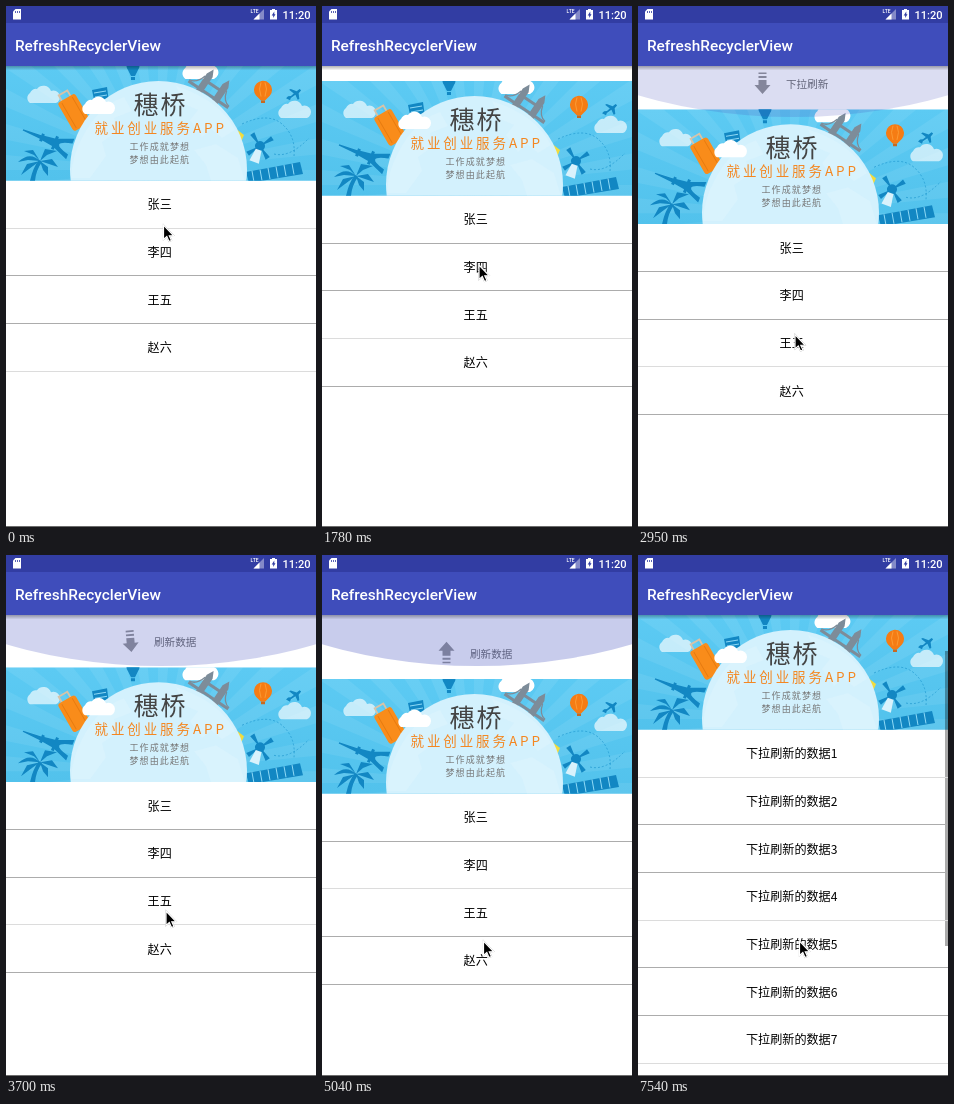
An HTML page that plays this animation: 310x521 px, repeating every 8000 ms.

```html
<!DOCTYPE html>
<html lang="zh-CN">
<head>
<meta charset="utf-8">
<title>RefreshRecyclerView</title>
<style>
html, body { margin: 0; width: 100%; height: 100%; overflow: hidden; background: #fff; }
svg { display: block; }
text { font-family: "Noto Sans CJK SC", "Noto Sans CJK", "Noto Sans", sans-serif; }
.ui { font-family: Roboto, sans-serif; font-weight: 500; fill: #fff; }
.mid { text-anchor: middle; }
#mouse { filter: drop-shadow(.6px .8px .5px rgba(0, 0, 0, .45)); }
</style>
</head>
<body>
<svg width="310" height="521" viewBox="0 0 310 521">
  <defs>
    <linearGradient id="sky" x2="0" y2="1">
      <stop stop-color="#5ccaf3"/><stop offset="1" stop-color="#52c2ec"/>
    </linearGradient>
    <linearGradient id="shade" x2="0" y2="1">
      <stop stop-opacity=".3"/><stop offset="1" stop-opacity="0"/>
    </linearGradient>
    <path id="cloud" d="M4 20a6 6 0 0 1 0-10 6 6 0 0 1 7-4 8 8 0 0 1 14 2 6 6 0 0 1 5 12Z"/>
    <path id="plane" d="M-9 1-6 0-3 1 1 0-2-6 0-6 5-1 9-2 10 0 6 2 4 8 2 8 2 2-4 3-6 5Z"/>
  </defs>
  <rect width="310" height="521" fill="#fff"/>

  <svg y="60" width="310" height="461">
    <g id="list">
      <g id="head">
        <text id="state" x="148" y="-21.500" font-size="10.600" fill="#6a6a6a"></text>
        <path id="arrow" fill="#949494" d="M0-11 8-2H4V3H-4V-2H-8ZM-4 5H4V7H-4ZM-4 9H4V10.6H-4Z"/>
        <path id="spin" fill="none" stroke="#e0303c" stroke-width="1.6"/>
      </g>
      <svg width="310" height="114.67">
        <rect width="310" height="115" fill="url(#sky)"/>
        <path id="rays" fill="#fff" opacity=".07"/>
        <g fill="#fff">
          <use href="#cloud" x="20" y="17" opacity=".65"/>
          <use href="#cloud" x="271" y="32" opacity=".65"/>
          <use href="#cloud" transform="translate(175 -9) scale(1.1)"/>
        </g>
        <g fill="#1287c3">
          <path transform="translate(42 74) rotate(22)"
            d="M-27-.6-8-2V-4H-5V-2.500L6-4V-7H9V-5L24-11V-6Q12-3 12 0T24 6V11L9 5V7H6V4L-5 2.500V4H-8V2L-27 .6Z"/>
          <path d="M24 115Q27 101 33 94L36 96Q30 104 29 115Z"/>
          <path d="M34 95Q24 85 12 96L22 94 34 95 21 98 15 109 27 100 34 95 27 84 18 85 28 89 34 95 39 83 51 85 41 89 34 95 46 93 52 101 43 98 34 95 42 101 42 110 37 104Z"/>
          <path d="M86 24 101 21 103 36 89 39Z"/>
          <path d="M122 4a6.500 6.500 0 1 1 10 0L129 10H125ZM125 11H129V14H125Z"/>
          <use href="#plane" transform="translate(287 28) rotate(-25) scale(.9)"/>
          <g transform="translate(254 80) rotate(20)">
            <path d="M0 0-13-7-10-11ZM0 0 7-13 11-10ZM0 0 13 7 10 11ZM0 0-7 13-11 10Z"/>
            <circle r="5"/>
            <path d="M-3 4 3 4 5 17H-5Z" fill="#d9f2fc"/>
          </g>
          <path id="tower" d="M240 106 294 96 297 108 243 117Z"/>
        </g>
        <path d="M88 27 100 25M89 31 101 29M90 35 101 33M246 105 248 116M254 103.500 256 114.500M262 102 264 113M270 100.500 272 111.500M278 99 280 110M286 97.500 288 108.500"
          stroke="#8fdaf6"/>
        <path d="M236 58Q262 46 276 58T288 90M268 88Q284 92 303 72" fill="none" stroke="#1f97cf"
          stroke-dasharray="2 2" opacity=".7"/>
        <g transform="translate(68 46) rotate(-30)">
          <path d="M-5-14V-22H5V-14" fill="none" stroke="#d8c3a8" stroke-width="1.8"/>
          <rect x="-10" y="-16" width="20" height="33" rx="3" fill="#f98c1a"/>
          <path d="M-6-14V15M6-14V15" stroke="#e87c10"/>
        </g>
        <g transform="translate(206 23) rotate(34)" fill="#7d8c99">
          <path d="M-24 5H24V8H-24ZM-13-10-9.500-17-6-10V11H-13ZM6-10 9.500-17 13-10V11H6ZM-7-5H7V-2H-7Z"/>
          <path d="M-24 5Q-16 4-13-7M24 5Q16 4 13-7" fill="none" stroke="#7d8c99" stroke-width="1.300"/>
        </g>
        <path d="M229 62 238 69 235 76Z" fill="#f2dc3c"/>
        <circle cx="152.500" cy="103.500" r="88.500" fill="#d3f1fd"/>
        <g fill="#eaf9ff" opacity=".25">
          <path d="M76 72Q92 40 118 31L126 45 108 52 112 65 96 76 100 90 84 112H65Q66 90 76 72Z"/>
          <path d="M170 20Q214 34 229 64L216 72 205 63 196 71 184 54 192 44 178 38Z"/>
          <path d="M188 84 210 78 232 92 239 115H205L200 99Z"/>
        </g>
        <use href="#cloud" x="75" y="28" fill="#fff"/>
        <g transform="translate(257 24.500)">
          <path d="M-7 5a9 9 0 1 1 14 0L2 10H-2Z" fill="#f57c14"/>
          <path d="M-2 6Q-5-2-2-8M2 6Q5-2 2-8" fill="none" stroke="#fb9a34"/>
          <path d="M-2 10H2V12.500H-2Z" fill="#c8691f"/>
        </g>
        <text x="127.500" y="47.500" font-size="25" letter-spacing="2" font-weight="300" fill="#444">穗桥</text>
        <text x="88.500" y="67" font-size="13.500" letter-spacing="2.900" font-weight="500" fill="#f4861f">就业创业服务APP</text>
        <g font-size="9" letter-spacing="1.100" fill="#777">
          <text x="123.500" y="84">工作成就梦想</text>
          <text x="123.500" y="96.500">梦想由此起航</text>
        </g>
      </svg>
      <g id="rows" font-size="12.100"></g>
    </g>
    <ellipse id="glow" cx="155" rx="465" fill="#3f4dbb"/>
    <rect id="bar" x="307" y="36" width="3" height="295" fill="#000" opacity=".33"/>
    <g id="lines"></g>
    <rect width="310" height="4.500" fill="url(#shade)"/>
    <rect y="460" width="310" height="1" fill="#6c6c6c"/>
  </svg>

  <rect width="310" height="60" fill="#3f4dbb"/>
  <rect width="310" height="17" fill="#323da3"/>
  <text class="ui" x="9" y="44.800" font-size="15.400">RefreshRecyclerView</text>
  <path d="M9.500 3H15V13.500H7V5.500Z" fill="#fff"/>
  <path d="M9.500 5V7M11.500 5V7M13.500 5V7" stroke="#323da3" stroke-width=".8"/>
  <text class="ui" x="244.500" y="7" font-size="5">LTE</text>
  <path d="M258 3V13.500H247.500Z" fill="#fff" opacity=".4"/>
  <path d="M253.500 7.500V13.500H247.500Z" fill="#fff"/>
  <path d="M264 4H266V3H269V4H271V13.500H264Z" fill="#fff"/>
  <path d="M268.300 5.500 265.700 9.500H267.200V12L269.500 8.300H268.300Z" fill="#323da3"/>
  <text class="ui" x="276.400" y="12.800" font-size="11.100">11:20</text>
  <path id="mouse" d="M0 0V14.500L3.300 11.600 5.500 16.500 8 15.500 5.800 10.700 10 10.500Z" fill="#000" stroke="#fff" stroke-width="1.200"/>
</svg>
<script>
const $ = id => document.getElementById(id);
const LOOP = 8000, START = 1040, STEP = 147.7, LEAD = 14;
const TOP = 114.6, PITCH = 47.67;
const SPIN_MS = 1333;

// keyframes as [step, value]
const PULL = [[-1, 0], [0, 1], [5, 15], [7, 26], [13, 43.3], [15, 46], [18, 52.3], [23, 61],
  [27, 64], [28, 64], [31, 51], [39, 51], [43, 0]];
const MOUSE_X = [[-1, 157.5], [5, 157], [13, 157], [18, 160], [23, 161.5]];
const MOUSE_Y = [[-1, 219], [5, 259], [7, 286], [13, 328.5], [18, 356], [23, 378], [27, 386]];
const GLOW = [[5, 0], [13, .19], [15, .235], [23, .245], [27, .286], [28, .27], [31, 0]];
const GLOW_SIZE = [[5, .3], [13, .82]];
const TURN = [[17, 180], [18, 175], [19, 40], [20, 0]];

const OLD = ['张三', '李四', '王五', '赵六'];
const NEW = Array.from({ length: 8 }, (_, i) => '下拉刷新的数据' + (i + 1));

function at(keys, x) {
  if (x <= keys[0][0]) return keys[0][1];
  for (let i = 1; i < keys.length; i++) {
    const [a, u] = keys[i - 1], [b, v] = keys[i];
    if (x <= b) return u + (v - u) * (x - a) / (b - a);
  }
  return keys[keys.length - 1][1];
}

const show = (id, on) => $(id).setAttribute('display', on ? 'inline' : 'none');
const set = (id, attrs) => {
  for (const k in attrs) $(id).setAttribute(k, attrs[k]);
};
const polar = (cx, cy, r, turn) => {
  const a = turn * 2 * Math.PI;
  return (cx + r * Math.cos(a)).toFixed(2) + ' ' + (cy + r * Math.sin(a)).toFixed(2);
};

function drawRays() {
  let d = '';
  for (let i = 0; i < 32; i++) {
    d += `M152 104L${polar(152, 104, 240, i / 32)} ${polar(152, 104, 240, (i + .5) / 32)}Z`;
  }
  set('rays', { d });
}

function drawRows(items) {
  $('rows').innerHTML = items.map((s, i) =>
    `<text class="mid" x="153.700" y="${(TOP + PITCH * i + 28.8).toFixed(1)}">${s}</text>`).join('');
}

// dividers sit on whole pixels, every third one paler
function drawLines(count, pull) {
  const pale = pull < 1 ? 1 : pull >= 60 ? 2 : 0;
  let s = '';
  for (let k = 1; k <= count; k++) {
    const y = Math.floor(TOP + PITCH * k + pull);
    s += `<rect y="${y}" width="310" height="1" fill="${k % 3 === pale ? '#dcdcdc' : '#acacac'}"/>`;
  }
  $('lines').innerHTML = s;
}

function drawSpinner(n) {
  const p = (n - 35) * STEP / SPIN_MS + 2, f = p % 1;
  const ease = x => x * x * (3 - 2 * x);
  const base = .03 + .2 * (p - 2);
  const from = base + .75 * ease(Math.max(0, f * 2 - 1)) + .75 * Math.floor(p - 2);
  const sweep = .12 + .75 * (ease(Math.min(1, f * 2)) - ease(Math.max(0, f * 2 - 1)));
  set('spin', {
    d: `M${polar(124.5, -25.5, 5.5, from)}A5.5 5.5 0 ${sweep > .5 ? 1 : 0} 1 ${polar(124.5, -25.5, 5.5, from + sweep)}`
  });
}

let lastItems = null, lastStep = null;

function update(ms) {
  const n = Math.max(-1, Math.min(44, Math.floor((ms % LOOP - START + LEAD) / STEP)));
  if (n === lastStep) return;
  lastStep = n;

  const pull = at(PULL, n), loading = n >= 29, done = n >= 40;
  const items = done ? NEW : OLD;
  if (items !== lastItems) drawRows(lastItems = items);
  drawLines(items.length, pull);

  set('list', { transform: `translate(0 ${pull.toFixed(2)})` });
  $('state').textContent = loading ? '正在刷新' : pull > 51 ? '刷新数据' : '下拉刷新';
  show('head', pull > 0);
  show('arrow', !loading);
  show('spin', loading);
  set('arrow', { transform: `translate(124.500 -26.300) rotate(${at(TURN, n)})` });
  drawSpinner(n);

  const size = at(GLOW_SIZE, n);
  set('glow', { cy: (62.3 - 465) * size, ry: 465 * size, opacity: at(GLOW, n) });
  show('bar', n >= 41);
  set('mouse', { transform: `translate(${at(MOUSE_X, n)} ${at(MOUSE_Y, n)})` });
}

drawRays();
const begin = performance.now();
function tick() {
  update(performance.now() - begin);
  requestAnimationFrame(tick);
}
tick();
</script>
</body>
</html>
```
